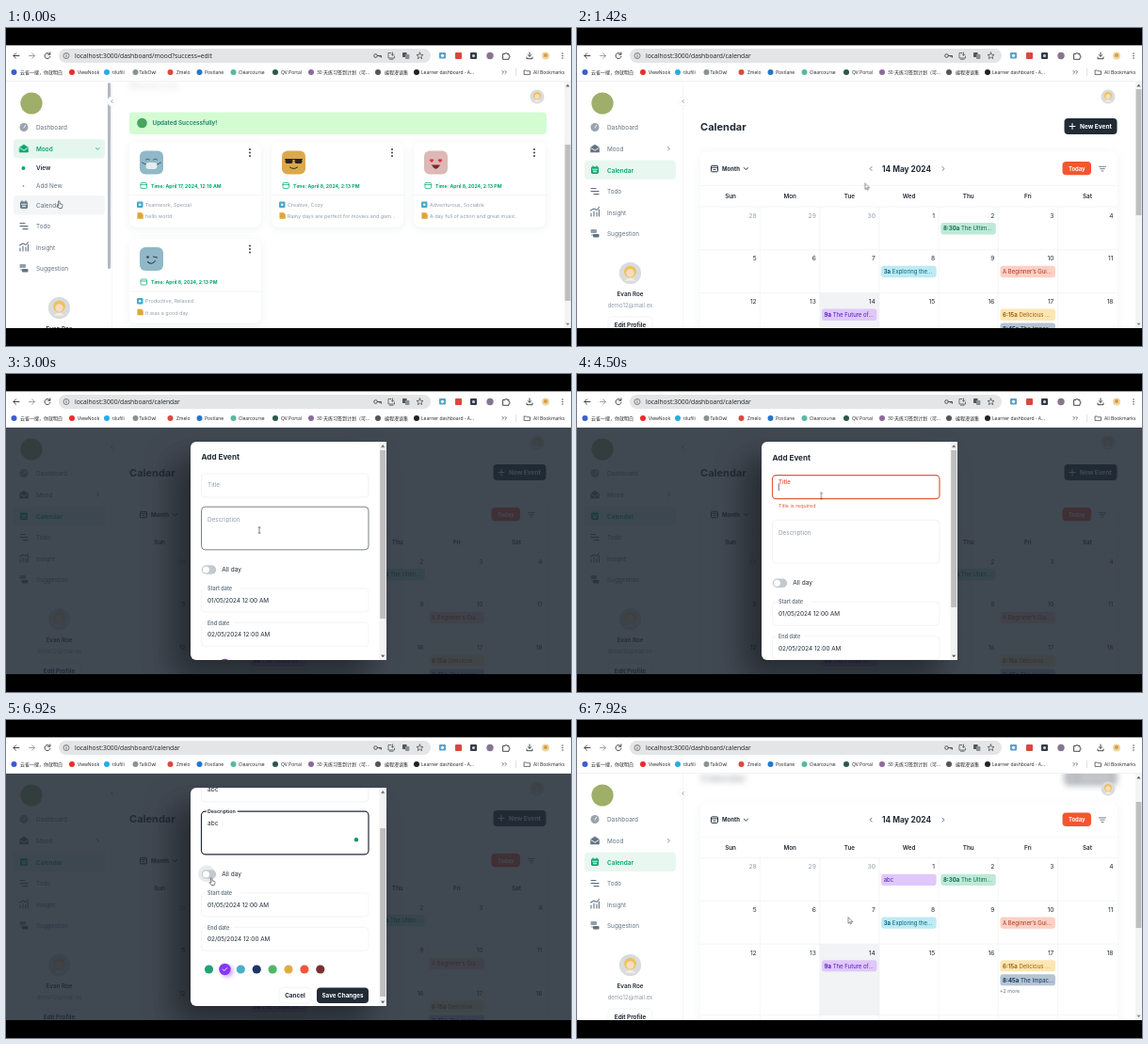
Recreate the animation shown at these times as an HTML page. Size 600 by 338 pixels, loop 8 s.

```html
<!DOCTYPE html>
<html lang="en">
<head>
<meta charset="utf-8">
<title>Mood calendar</title>
<style>
html,body{margin:0;height:100%;overflow:hidden;background:#000}
svg{display:block}
text{font-family:Inter,sans-serif;white-space:pre}
.chrome text{font-family:"Open Sans","Noto Sans CJK SC","Noto Sans CJK",sans-serif}

/* 1% of the loop is 80 ms */
[class]{animation:8s linear infinite}
.chrome{animation:none}
.mood{animation-name:mood}
.cal{animation-name:cal}
.sub{animation-name:sub}
.nav{animation-name:nav}
.page{animation-name:page}
.thumb{animation-name:thumb}
.head{animation-name:head}
.veil{animation-name:veil}
.hover{animation-name:hover}
.added{animation-name:added}
.bar{animation-name:bar}
.modal{animation-name:modal}
.form{animation-name:form}
.formThumb{animation-name:formThumb,formSize;animation-timing-function:linear,step-end}
.below{animation-name:below}
.error{animation-name:error}
.titleBox{animation-name:titleBox}
.descBox{animation-name:descBox}
.titleLabel{animation-name:shrink,titleInk;animation-timing-function:linear,step-end}
.descLabel{animation-name:shrink,descInk;animation-timing-function:linear,step-end;animation-delay:.96s,0s}
.key{animation-name:key}
.caret{animation-name:caret;opacity:0}
.halo{animation-name:halo}
.dot{animation-name:dot}
.pointer{animation-name:pointer;animation-timing-function:ease-in-out}
.arrow{animation-name:arrow}
.hand{animation-name:hand}
.beam{animation-name:beam}
.mood,.cal,.veil,.hover,.added,.bar,.below,.error,.titleBox,.descBox,.key,.caret,.halo,.dot,.arrow,.hand,.beam{animation-timing-function:step-end}

@keyframes mood{0%{opacity:1}3.5%,100%{opacity:0}}
@keyframes cal{0%{opacity:0}3.5%,100%{opacity:1}}
@keyframes sub{0%,3.5%{opacity:1}5.5%,100%{opacity:0}}
@keyframes nav{0%,3.5%{transform:translateY(37px)}6.5%,100%{transform:none}}
@keyframes page{0%,96.6%{transform:none}98.6%,100%{transform:translateY(-43.4px)}}
@keyframes thumb{0%,96.6%{transform:none}98.6%,100%{transform:translateY(22px)}}
@keyframes head{0%,96.8%{filter:none}97.4%,100%{filter:blur(3px)}}
@keyframes veil{0%{opacity:.65}3.5%{opacity:0}97%,100%{opacity:.65}}
@keyframes hover{0%{opacity:0}26.5%{opacity:1}34.5%,100%{opacity:0}}
@keyframes added{0%{opacity:0}94.5%,100%{opacity:1}}
@keyframes bar{0%{opacity:1}32%{opacity:0}96.2%,100%{opacity:1}}
@keyframes modal{0%,31.9%{opacity:0}34.7%,94%{opacity:1}96.4%,100%{opacity:0}}
@keyframes form{0%,39.5%{transform:none}42.5%,49%{transform:translateY(-47px)}52%,77.5%{transform:translateY(1.7px)}80.5%,100%{transform:translateY(-44px)}}
@keyframes formThumb{0%,39.5%{transform:none}42.5%,49%{transform:translateY(35px)}52%,77.5%{transform:none}80.5%,100%{transform:translateY(34px)}}
@keyframes formSize{0%{height:179px}45.5%{height:167px}59.4%,100%{height:179px}}
@keyframes below{0%{transform:none}45.5%{transform:translateY(12.6px)}59.4%,100%{transform:none}}
@keyframes error{0%{opacity:0}45.5%{opacity:1}59.4%,100%{opacity:0}}
@keyframes titleBox{0%{stroke:#e6eaed;stroke-width:.6}45.5%{stroke:#e4593c;stroke-width:.7}55.4%{stroke:#e4593c;stroke-width:1.2}59.4%{stroke:#212b36;stroke-width:1.2}67.2%,100%{stroke:#e6eaed;stroke-width:.6}}
@keyframes descBox{0%{stroke:#e6eaed;stroke-width:.6}35%{stroke:#58636e;stroke-width:.8}39.5%{stroke:#e6eaed;stroke-width:.6}67.2%{stroke:#212b36;stroke-width:1.2}92.8%,100%{stroke:#e6eaed;stroke-width:.6}}
@keyframes shrink{0%,55.2%{transform:none;font-weight:400}55.3%{transform:none;font-weight:600}57.7%,97%{transform:translateY(-13.2px) scale(.84);font-weight:600}97.1%,100%{transform:none;font-weight:400}}
@keyframes titleInk{0%{fill:#919eab}45.5%{fill:#e4593c}59.4%{fill:#212b36}67.2%,100%{fill:#637381}}
@keyframes descInk{0%{fill:#919eab}67.2%,100%{fill:#212b36}}
@keyframes key{0%{fill:transparent}59.4%{fill:#212b36}96.5%,100%{fill:transparent}}
@keyframes caret{0%{opacity:0}55.4%{opacity:1;transform:none}59.4%{opacity:1;transform:translateX(4px)}61.3%{opacity:1;transform:translateX(8px)}63.2%{opacity:1;transform:translateX(12px)}67.2%,100%{opacity:0}}
@keyframes halo{0%{opacity:0}82.5%{opacity:1}88.5%,100%{opacity:0}}
@keyframes dot{0%{opacity:0}71.5%,100%{opacity:1}}
@keyframes pointer{
0%,3.5%{transform:translate(56px,184px)}
9%{transform:translate(290px,165px)}
11.5%{transform:translate(305.5px,164.5px)}
23%{transform:translate(306px,166px)}
28%,32%{transform:translate(343.5px,219.5px)}
36%,39.5%{transform:translate(269px,166px)}
43%,48%{transform:translate(357px,291px)}
54%,60%{transform:translate(259.5px,129.5px)}
66%,78%{transform:translate(262px,168px)}
83%,87.5%{transform:translate(217.8px,168px)}
91%,94%{transform:translate(357px,291px)}
98%,100%{transform:translate(288px,210px)}}
@keyframes arrow{0%{opacity:0}4.5%{opacity:1}34.5%{opacity:0}41%{opacity:1}42%{opacity:0}49%{opacity:1}51%{opacity:0}94.8%,100%{opacity:1}}
@keyframes hand{0%{opacity:1}4.5%{opacity:0}42%{opacity:1}49%{opacity:0}82%{opacity:1}94.8%,100%{opacity:0}}
@keyframes beam{0%{opacity:0}34.5%{opacity:1}41%{opacity:0}51%{opacity:1}82%,100%{opacity:0}}
</style>
</head>
<body>
<svg id="stage" width="600" height="338" viewBox="0 0 600 338"></svg>
<script>
const INK = '#212b36', GREY = '#637381', PALE = '#919eab', GREEN = '#00a76f', RED = '#e4593c', LINE = '#eceff1';
const bold = 'font-weight="700"', semi = 'font-weight="600"', mid = 'text-anchor="middle"', end = 'text-anchor="end"';

const text = (x, y, size, str, fill = INK, more = '') =>
  `<text x="${x}" y="${y}" font-size="${size}" fill="${fill}" ${more}>${str}</text>`;
const rect = (x, y, w, h, fill, r = 0, more = '') =>
  `<rect x="${x}" y="${y}" width="${w}" height="${h}" rx="${r}" fill="${fill}" ${more}/>`;
const box = (x, y, w, h, r, more = `stroke="${LINE}" stroke-width=".7"`) => rect(x, y, w, h, 'none', r, more);
const disc = (x, y, r, fill, more = '') => `<circle cx="${x}" cy="${y}" r="${r}" fill="${fill}" ${more}/>`;
const path = (d, stroke = INK, width = 1, fill = 'none') =>
  `<path d="${d}" stroke="${stroke}" stroke-width="${width}" fill="${fill}" stroke-linecap="round" stroke-linejoin="round"/>`;
const group = (cls, ...kids) => `<g class="${cls}">${kids.join('')}</g>`;
const at = (x, y, ...kids) => `<g transform="translate(${x} ${y})">${kids.join('')}</g>`;
const view = (x, y, w, h, ...kids) =>
  `<svg x="${x}" y="${y}" width="${w}" height="${h}" viewBox="${x} ${y} ${w} ${h}">${kids.join('')}</svg>`;

const avatar = (x, y, r) => at(x, y,
  disc(0, 0, r, '#d9dcdc'), disc(0, -r * .12, r * .55, '#edc25c'), disc(0, 0, r * .36, '#f7dcc0'),
  path(`M${-r * .5} ${r * .72}Q0 ${r * .2} ${r * .5} ${r * .72}Z`, 'none', 0, '#f4efe4'));

const calendarIcon = (x, y, fill) => at(x, y,
  rect(-4, -3.5, 8, 7.5, fill, 1.4), rect(-3, -1.3, 6, .9, '#fff'),
  rect(-2.2, .6, 4.4, 1.8, '#fff', 0, 'opacity=".7"'), path('M-2-4.4v1.5M2-4.4v1.5', fill, .9));

/* Browser frame */
const bookmarks = [
  [8.5, 15, '#3b5bd6', '云雀一搜，你就明白'], [70, 76, '#f02a2a', 'ViewNook'], [107, 113, '#23ade5', 'tilufili'],
  [137.5, 141.5, '#8a9390', 'TalkOwl'], [174.5, 181, '#dc4a3c', 'Zmelo'], [205.5, 211, '#2378cc', 'Postlane'],
  [241.5, 247, '#57b9a0', 'Clearcourse'], [286, 292, '#29584c', 'QV Portal'], [324, 330, '#8d6a9d', '30 天练习签到计划（可…'],
  [395, 402, '#555', '编程漫谈集'], [436, 441, '#222', 'Learner dashboard - A...']];
const url = 'localhost:3000/dashboard/';
const browser = `<g class="chrome">` + [
  rect(0, 18.4, 600, 38.6, '#fff'), rect(56, 22, 395, 15, '#e4e5e7', 7.5),
  path('M8 29.5h6M10.6 26.8l-2.7 2.7 2.7 2.7', '#333', .9), path('M24.5 29.5h6M27.8 26.8l2.7 2.7-2.7 2.7', '#999', .9),
  path('M46.5 27.8a3 3 0 1 0 .5 2.4M46.9 25.9v2.3h-2.3', '#333', .9),
  disc(64, 29.5, 3, 'none', 'stroke="#555" stroke-width=".7"'), path('M64 29.2v1.7M64 27.9v.1', '#555', .7),
  group('mood', text(73, 32, 6.76, url + 'mood?success=edit', '#222')),
  group('cal', text(73, 32, 6.76, url + 'calendar', '#222')),
  disc(392.5, 29.5, 1.8, 'none', 'stroke="#444" stroke-width=".9"'), path('M394.5 29.5h4v1.6M397 29.5v1.3', '#444', .9),
  path('M409 26.5h-3v5.5h6.5v-2M410.5 26v3M409.2 28l1.3 1.3 1.3-1.3M407.5 33.2h3.5', '#444', .7),
  rect(421, 26, 4.6, 5, '#555', .7), rect(424, 28, 4.4, 5, '#8a8f96', .7),
  path('M439.5 26l1 2.3 2.5.2-1.9 1.6.6 2.5-2.2-1.4-2.2 1.4.6-2.5-1.9-1.6 2.5-.2Z', '#444', .7),
  rect(460, 26, 7, 6.5, '#5d9fc4', 1), disc(463.5, 29.3, 1.6, '#fff'),
  rect(477, 26, 7, 7, '#d9473f', 1), rect(493, 26, 7, 7, '#363b44', 1), disc(496.5, 29.5, 1.5, '#cde'),
  disc(514, 29.5, 3.7, '#87768f'),
  path('M528 27.5h2a1 1 0 0 1 2 0h2v2a1 1 0 0 1 0 2v1.8h-6Z', '#333', .9),
  path('M556 26v4M554.3 28.6l1.7 1.7 1.7-1.7M553 31v1.7h6V31', '#333', .9),
  disc(573, 29.5, 4, '#e9d7a0'), disc(573, 29, 2, '#d89a3e'), ...[27, 29.5, 32].map(y => disc(591, y, .7, '#333')),
  ...bookmarks.map(([icon, x, color, name]) => disc(icon, 47, 3, color) + text(x, 49, 5, name, '#222')),
  path('M527 45.5l1.5 1.5-1.5 1.5M530 45.5l1.5 1.5-1.5 1.5', '#333', .7), rect(541, 43, .6, 8, '#ccd'),
  path('M550.5 45h2l.8.8h3.2v3.6h-6Z', '#333', .7), text(560, 49, 5, 'All Bookmarks', '#222'),
  rect(0, 56, 600, .5, '#e4e4e4')].join('') + '</g>';

/* Sidebar */
const label = (y, str, fill = GREY, more = '') => text(32, y, 6.4, str, fill, more);
const pill = (y, fill) => rect(8, y, 97, 20.5, fill, 4);
const envelope = fill => path('M14.5 127l4.5-3 4.5 3v5h-9Z', fill, .6, fill) + path('M15 127.6l4 2.6 4-2.6', '#fff', .9);
const sidebar = [
  rect(0, 56, 112.5, 263, '#fff'), rect(112.3, 56, .6, 263, LINE), disc(27, 80, 11.6, '#9fae69'),
  disc(19, 105.5, 4.5, '#9aa4ae'), path('M19 106l1.7-2.6', '#fff', .9), label(108.2, 'Dashboard'),
  group('mood', pill(118, '#e5f6ef'), envelope(GREEN), label(131, 'Mood', GREEN, semi), path('M95.5 127.4l1.8 1.8 1.8-1.8', GREEN, .8)),
  group('cal', envelope(GREY), label(131, 'Mood'), path('M96.5 126.5l1.8 1.8-1.8 1.8', GREY, .8)),
  group('sub', disc(18.5, 149, 2, GREEN), label(151.3, 'View', INK, semi), disc(18.5, 168, .9, PALE), label(170.4, 'Add New')),
  group('nav',
    group('mood', pill(141, '#f3f5f6'), calendarIcon(19, 151, GREY), label(153.5, 'Calendar')),
    group('cal', pill(140.5, '#e9f7f1'), calendarIcon(19, 151, GREEN), label(153.5, 'Calendar', GREEN, semi)),
    path('M15 170.5h5M15 173.6h8M18 176.7h5', GREY, 1.2), label(176, 'Todo'),
    path('M15 200v-3M18 200v-5M21 200v-4M23.4 200v-7M14.5 194l3.5-2 3 1.5 2.5-3', GREY, 1.1), label(198.6, 'Insight'),
    rect(14.5, 214, 6.5, 4, PALE, 1), rect(17, 219, 6.5, 3.5, GREY, 1), path('M15.5 220h6', GREY, .8), label(221, 'Suggestion'),
    avatar(56.5, 260.5, 11.6), text(56.5, 285.3, 6.3, 'Evan Roe', INK, semi + mid),
    text(56.5, 297, 6, 'demo12@mail.ex', PALE, mid),
    box(33, 307, 47, 17, 4), text(56.5, 318, 6.3, 'Edit Profile', INK, bold + ' ' + mid)),
  group('mood', rect(108, 58, 3.2, 198, '#b3b9bf', 1.6)),
  disc(112.5, 78, 5, '#fff', `stroke="${LINE}" stroke-width=".6"`), path('M113.2 76.4l-1.5 1.5 1.5 1.5', GREY, .7)].join('');

/* Mood page */
const card = (x, y, w, h) => rect(x, y, w, h, '#fff', 7, 'style="filter:drop-shadow(0 2px 4px #919eab26)"');
const heart = (x, y) => path(`M${x} ${y + 2}l-2-2a1.1 1.1 0 0 1 2-1.2a1.1 1.1 0 0 1 2 1.2Z`, 'none', 0, '#df3044');
const moods = [
  [131, 121.5, '#91b8c6', '17, 2024, 12:16 AM', 'Teamwork, Special', 'hello world',
    rect(-6, 0, 12, 7, '#e5edf0', 3) + path('M-6-3q2-2 4 0M2-3q2-2 4 0M-10 0l4 2M10 0l-4 2', '#375561', .9)],
  [282, 121.5, '#dba94c', '8, 2024, 2:13 PM', 'Creative, Cozy', 'Rainy days are perfect for movies and gam…',
    rect(-9, -4, 8, 5, '#2b2520', 2) + rect(1, -4, 8, 5, '#2b2520', 2) + path('M-9-3.5H9M-4 5q4 3 8 0', '#2b2520', 1)],
  [433, 121.5, '#dcb9b5', '8, 2024, 2:13 PM', 'Adventurous, Sociable', 'A day full of action and great music.',
    heart(-4.5, -2) + heart(4.5, -2) + path('M-4 3q4 7 8 0Z', '#7d2630', .6, '#7d2630')],
  [131, 224, '#91b8c6', '8, 2024, 2:13 PM', 'Productive, Relaxed', 'It was a good day.',
    disc(-4, -2, 1.3, '#29434d') + path('M2-2.5l4 1M-4 3q4 4 8-1', '#29434d', 1.1)]];
const moodCard = ([x, y, color, when, tags, note, face]) => card(x, y, 140, 90) + at(x, y,
  rect(11, 9, 25, 25, color, 6), at(23.5, 21.5, face),
  ...[7.5, 11, 14.5].map(dy => disc(128, dy, .9, INK)),
  box(12, 43, 6.5, 6, 1, `stroke="${GREEN}" stroke-width=".7"`), path('M12 45h6.5', GREEN, .7),
  text(23, 48.3, 5.15, 'Time: April ' + when, GREEN, bold), path('M0 56H140', LINE, .6),
  rect(8, 63, 6.5, 6.5, '#48a8cb', 1.2), disc(11.2, 66.2, 1.3, '#dff'), text(17, 68.4, 5.45, tags, PALE),
  path('M9 75h4l1.5 2v4h-5.5Z', '#dfa638', .6, '#dfa638'), text(17, 80.6, 5.45, note, PALE));
const moodPage = group('mood',
  text(131, 65, 11, 'Mood List', INK, `${bold} opacity=".3" style="filter:blur(3px)"`),
  rect(131, 89.5, 443, 23.5, '#d3fcd2', 4), disc(144.5, 101, 5.3, '#45a55f'),
  text(155.5, 103.3, 6.3, 'Updated Successfully!', '#1b806a', semi),
  ...moods.map(moodCard));

/* Calendar page */
const left = 131.5, col = 63.15, rows = [190, 235.8, 281.6, 357];
const event = (c, y, fill, ink, time, name, cls = 'cal') => {
  const x = left + c * col + 2.2;
  return group(cls, rect(x, y, 58.5, 12.4, fill, 3),
    `<text x="${x + 2.6}" y="${y + 8.4}" font-size="6" fill="${ink}">${time && `<tspan ${bold}>${time}</tspan> `}${name}</text>`);
};
const days = Array.from({length: 21}, (_, i) => {
  const x = left + (i % 7 + 1) * col - 4;
  return text(x.toFixed(1), rows[i / 7 | 0] + 11.5, 6.7, i < 3 ? 28 + i : i - 2, i < 3 ? PALE : INK, end);
});
const weekdays = ['Sun', 'Mon', 'Tue', 'Wed', 'Thu', 'Fri', 'Sat'];
const calendarPage = group('cal', group('page',
  group('head', text(131, 108.5, 11, 'Calendar', INK, bold), rect(517.5, 96, 56, 17, INK, 4),
    path('M523 104.5h6M526 101.5v6', '#fff', 1), text(534, 106.9, 6.5, 'New Event', '#fff', bold)),
  card(131, 131, 443, 330),
  box(142.5, 146.3, 7, 6.5, 1, `stroke="${INK}" stroke-width="1"`), path('M142.5 148.3h7M145 150.5h2', INK, .9),
  text(154, 151.7, 6, 'Month', INK, bold), path('M177.4 148.6l2 2 2-2', INK, 1),
  path('M313 147.5l-2 2 2 2M388 147.5l2 2-2 2', GREY, .9), text(324, 152.7, 8.3, '14 May 2024', INK, bold),
  rect(515.5, 142, 30.5, 14.3, '#f5552f', 4), text(530.8, 151.6, 5.9, 'Today', '#fff', bold + ' ' + mid),
  path('M554.5 147.3h7M555.7 149.6h4.6M557 151.9h2', GREY, .9),
  rect(left + 2 * col, rows[2], col, 75.4, '#f1f3f4'),
  group('hover', rect(left + 3 * col, rows[0], col, 45.8, '#eff2f1')),
  ...weekdays.map((d, i) => text(left + (i + .5) * col, 181.2, 6.3, d, INK, semi + ' ' + mid)),
  ...[167.5, ...rows].map(y => path(`M131.5 ${y}H574`, LINE, .6)),
  ...weekdays.slice(1).map((_, i) => path(`M${left + (i + 1) * col} 190V440`, LINE, .6)),
  ...days,
  event(3, 207, '#dfc8fc', '#5119b7', '', 'abc', 'added'),
  event(4, 207, '#bfe9d7', '#08694c', '8:30a', 'The Ultim…'),
  event(3, 252.8, '#bcebf4', '#0b5b7a', '3a', 'Exploring the…'),
  event(5, 252.8, '#fdd0c4', '#a83520', '', 'A Beginner’s Gui…'),
  event(2, 298.6, '#dfc8fc', '#5119b7', '9a', 'The Future of…'),
  event(5, 298.6, '#fde6b2', '#946012', '6:15a', 'Delicious …'),
  event(5, 313.6, '#b5c4d3', '#12355c', '8:45a', 'The Impac…'),
  text(449, 333.5, 5.4, '+2 more', GREY)));

const scrollbar = group('bar', rect(593, 56, 7, 263, '#f4f4f4'),
  path('M595 62l1.5-2 1.5 2Z', '#555', .4, '#555'), path('M595 314l1.5 2 1.5-2Z', '#888', .4, '#888'),
  group('mood', rect(593.6, 124, 5.8, 166, '#bfbfbf')),
  group('cal', group('thumb', rect(593.6, 65, 5.8, 134, '#bfbfbf'))));

/* Add-event dialog */
const typed = (x, y, start) => `<text x="${x}" y="${y}" font-size="6.5" fill="transparent">` +
  [...'abc'].map((ch, i) => `<tspan class="key" style="animation-delay:${start + i * .15}s">${ch}</tspan>`).join('') + '</text>';
const caret = (y, delay) => rect(213.8, y, .7, 8, INK, 0, `class="caret" style="animation-delay:${delay}s"`);
const notch = (x, y, str) => rect(x - 1.5, y, str.length * 3.3 + 3, 4, '#fff');
const floating = (y, cls, str) => at(214, y, group(cls, notch(0, -4.5, str), text(0, 0, 6.4, str, 'inherit')));
const dateField = (y, name, value) => box(207.5, y, 177.5, 25, 4) + notch(214, y - 2, name) +
  text(214, y + 2.2, 5.5, name, GREY, semi) + text(214, y + 15, 6.4, value);
const swatches = ['#22a178', '#8638f5', '#48b0ca', '#1d3566', '#4cb865', '#e2ab42', '#f0573a', '#793030'];
const form = group('form',
  text(207.5, 90.7, 8.1, 'Add Event', INK, bold),
  box(207.5, 106, 177.5, 25, 4, 'class="titleBox"'), floating(120.3, 'titleLabel', 'Title'), typed(214, 120, 0), caret(114.5, 0),
  group('error', text(214, 140.8, 5.4, 'Title is required', RED)),
  group('below',
    box(207.5, 141.2, 177.5, 45.6, 4, 'class="descBox"'), floating(156.7, 'descLabel', 'Description'), typed(214, 155.8, .96), caret(150, .96),
    group('dot', disc(372, 171.3, 2.2, '#16916f')),
    group('halo', disc(213, 207.3, 9, PALE, 'opacity=".2"')),
    rect(207.7, 203.3, 15.5, 9.4, '#c2c9cf', 4.7), disc(212.4, 208, 3.5, '#fff'), text(229.3, 210.2, 6.5, 'All day'),
    dateField(228, 'Start date', '01/05/2024 12:00 AM'), dateField(264.3, 'End date', '02/05/2024 12:00 AM'),
    disc(235, 311, 6.5, swatches[1], 'opacity=".4" style="filter:blur(2px)"'),
    ...swatches.map((c, i) => disc(215.5 + i * 16.9, 309, i === 1 ? 6.2 : 4.6, c)),
    path('M230.2 309l1.5 1.5 3-3', '#fff', .9),
    box(290, 328.5, 34, 16.5, 4), text(307, 339.1, 6.4, 'Cancel', INK, bold + ' ' + mid),
    rect(330, 328.5, 55, 16.5, INK, 4), text(357.5, 339.1, 6.3, 'Save Changes', '#fff', bold + ' ' + mid)));
const dialog = group('modal', rect(0, 56.5, 600, 263, INK, 0, 'opacity=".86"'),
  rect(196, 72, 208, 232, '#fff', 6, 'style="filter:drop-shadow(-18px 18px 16px #0006)"'),
  view(196, 72, 208, 232, form, rect(396.5, 72, 7.5, 232, '#f3f3f3'),
    rect(397.2, 81, 6, 179, '#bfbfbf', 0, 'class="formThumb"'),
    path('M398.7 77.5l1.5-2 1.5 2Z', '#555', .4, '#555'), path('M398.7 299l1.5 2 1.5-2Z', '#555', .4, '#555')));

const pointer = group('pointer',
  group('arrow', path('M0 0v6.2l1.5-1.4 1 2.2 1-.5-1-2h2Z', '#222', .5, '#fff')),
  group('hand', path('M-.3 0q1-.8 1.3.5v2.3l2.2.5q1 .3.8 1.5l-.6 2.7h-3.2l-2-2.7q.3-1 1.5 0Z', '#222', .6, '#fff')),
  group('beam', path('M-1-3h2M0-3v6M-1 3h2', '#333', .6)));

document.getElementById('stage').innerHTML = rect(0, 0, 600, 338, '#000') + rect(0, 19, 600, 300, '#fff') +
  view(0, 56, 600, 263, moodPage, calendarPage,
    group('veil', rect(113, 56, 480, 31, '#fff')), avatar(564, 73, 7.5), sidebar, scrollbar, dialog) +
  browser + pointer;
</script>
</body>
</html>
```
